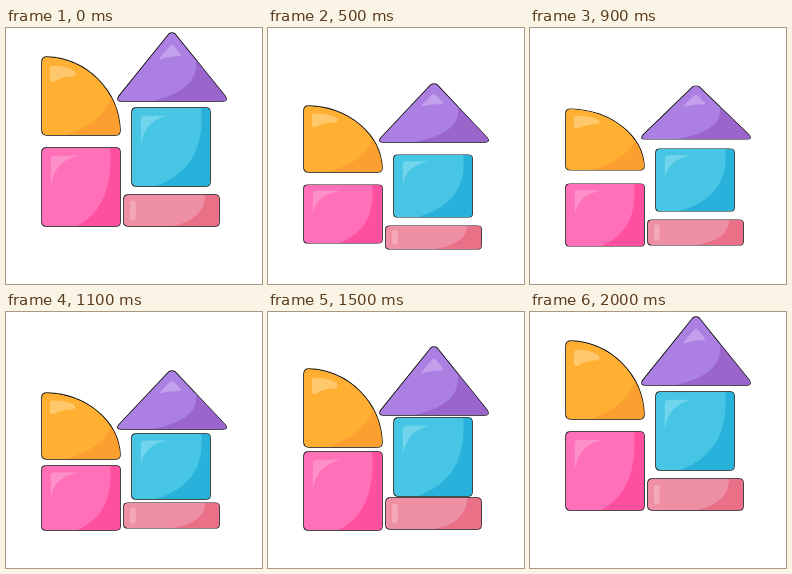
These frames come from a looping animation (256x256 px, 2100 ms). An HTML page with a canvas:

```html
<!DOCTYPE html>
<html>
<head>
<meta charset="utf-8">
<style>
html, body { margin: 0; width: 100%; height: 100%; overflow: hidden; background: #fff; }
canvas { display: block; }
</style>
</head>
<body>
<canvas id="stage" width="256" height="256"></canvas>
<script>
const ctx = document.getElementById('stage').getContext('2d');
const STEP = 100, STEPS = 21, LAST = STEPS - 1;

const mix = (a, b, p) => a + (b - a) * p;

// Linear motion through [step, value] points, held at both ends.
function track(...keys) {
  return t => {
    const i = keys.findIndex(k => k[0] >= t);
    if (i < 0) return keys[keys.length - 1][1];
    if (i === 0) return keys[0][1];
    const [t0, v0] = keys[i - 1], [t1, v1] = keys[i];
    return mix(v0, v1, (t - t0) / (t1 - t0));
  };
}

const floorAt = t => Math.min(199 + 3.4 * t, 218.5, 199 + 4 * (LAST - t));
const squashAt = track([0, 0], [5, 0.2], [9, 0.205], [13, 0.12], [15, 0]);
const leanAt = track([5, 0.25], [9, 0], [13, 0.25]);  // lower blocks give way more
const spreadAt = track([0, 1], [9, 1.05], [13, 0], [17, 0.7], [LAST, 1]);
const sagAt = track([0, 0], [5, 6], [8, -0.5], [13, -2], [17, 0]);
const floatAt = track([0, 0], [5, 6], [9, 2.5], [13, 0]);

const box = (w, h, r = 4) =>
  `M0 ${r}Q0 0 ${r} 0H${w - r}Q${w} 0 ${w} ${r}V${h - r}Q${w} ${h} ${w - r} ${h}H${r}Q0 ${h} 0 ${h - r}Z`;

// gap: distance to the block below, [closed, open]; level: 1 bottom, 0 middle, -1 top.
const block = (x, w, h, level, gap, colors, ...paths) =>
  ({ x, w, h, level, gap, colors, paths: paths.map(d => new Path2D(d)) });

const base = block(117, 97, 33, 1, [0, 0], ['#ee8fa5', '#ea7088', '#f4a9b7'],
  box(97, 33),
  'M83 0Q82 26 50 33H97V0Z',
  'M6 8Q6 6 8 6H10Q12 6 12 9V24Q12 27 9 27Q6 27 6 24Z');

const wall = block(125, 80, 80, 0, [-4, 7], ['#47c5e5', '#28b1db', '#70d5ec'],
  box(80, 80),
  'M71 0Q76 62 24 80H80V0Z',
  'M9 12Q9 8 13 8H36Q13 13 9 38Z');

const roof = block(111, 110, 70, -1, [-2, 5], ['#ac7fe2', '#9a66cc', '#c2a0ec'],
  'M52 1Q55 -1 58 1L109 65Q112 70 107 70H3Q-2 70 1 65Z',
  'M78 22Q88 58 35 70H110V22Z',
  'M43 27Q41 27 43 25L53 13Q55 11 57 13L64 22Q65 24 63 24Q52 24 43 27Z');

const cube = block(35, 80, 80, 1, [0, 0], ['#ff70b8', '#ff50a0', '#ff8fc8'],
  box(80, 80),
  'M70 0Q74 61 36 80H80V0Z',
  'M9 12Q9 8 13 8H38Q12 13 9 40Z');

const quarter = block(35, 80, 80, -1, [-2, 11], ['#ffb032', '#fb9f30', '#ffc86c'],
  'M0 5Q0 0 5 0A78 78 0 0 1 80 75Q80 80 75 80H5Q0 80 0 75Z',
  'M73 34Q66 66 25 80H80V34Z',
  'M8 12Q8 9 12 9Q24 9 33 14Q37 19 31 20Q20 20 13 25Q8 27 8 22Z');

const left = [cube, quarter], right = [base, wall, roof];

// Pile the blocks up from the floor.
function stack(blocks, floor, t) {
  let y = floor;
  for (const b of blocks) {
    y -= mix(...b.gap, spreadAt(t));
    if (b === roof) y -= floatAt(t);
    b.bottom = Math.round(y);
    y -= b.h * (1 - squashAt(t) * (1 + b.level * leanAt(t)));
    b.top = Math.round(y);
  }
}

function place(b) {
  ctx.setTransform((b.w - 2) / b.w, 0, 0, (b.bottom - b.top - 2) / b.h, b.x + 1, b.top + 1);
}

function draw(now) {
  const t = Math.floor(now / STEP) % STEPS;
  stack(left, floorAt(t), t);
  stack(right, floorAt(t) + sagAt(t), t);
  const blocks = [...right, ...left];

  ctx.resetTransform();
  ctx.fillStyle = '#fff';
  ctx.fillRect(0, 0, 256, 256);

  // Outlines lie behind every fill, so touching blocks show no seam.
  ctx.strokeStyle = '#111';
  ctx.lineWidth = 1.6;
  for (const b of blocks) {
    place(b);
    ctx.stroke(b.paths[0]);
  }
  for (const b of blocks) {
    ctx.save();
    place(b);
    ctx.clip(b.paths[0]);
    b.paths.forEach((path, i) => {
      ctx.fillStyle = b.colors[i];
      ctx.fill(path);
    });
    ctx.restore();
  }
}

const start = performance.now();
function tick() {
  draw(performance.now() - start);
  requestAnimationFrame(tick);
}
tick();
</script>
</body>
</html>
```
